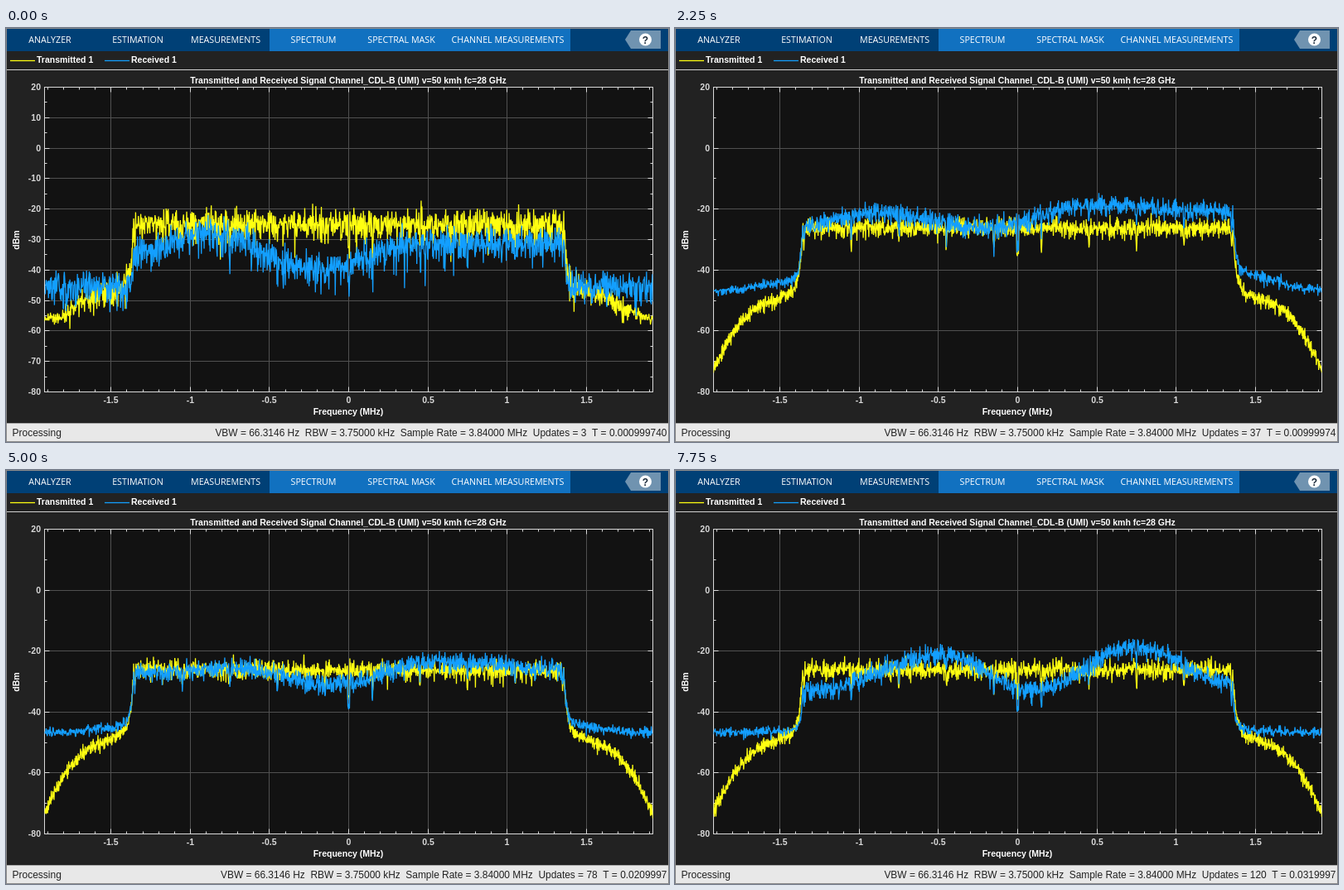
Animation, 800 px wide and 500 px high, one loop 8 s. Source, as an HTML page with a canvas:

```html
<!DOCTYPE html>
<html lang="en">
<head>
<meta charset="utf-8">
<title>Spectrum analyzer</title>
<style>
  html, body { margin: 0; width: 100%; height: 100%; overflow: hidden; background: #222; }
  canvas { display: block; }
</style>
</head>
<body>
<canvas id="stage" width="800" height="500"></canvas>
<script>
const ctx = document.getElementById('stage').getContext('2d');
const STEPS = 32, STEP_MS = 250, BINS = 1537, MEMORY = 0.515;
const BAND_EDGE = 1.357, BAND_LEVEL = -26, FLOOR = -46.6, STARTUP = -55.6;
const YELLOW = '#ffff11', BLUE = '#139fff';
const BOLD = 'bold 10.5px "Liberation Sans", Arial, sans-serif';
const PLOT = { left: 46.5, right: 780.5, top: 71.5, bottom: 439.5 };

const xOf = f => 413.5 + f * 191.15;
const yOf = db => PLOT.top + (20 - db) * 3.68;
const freq = i => -1.92 + i * 0.0025;
const toPower = db => 10 ** (db / 10);
const toDb = p => 10 * Math.log10(p);
const clamp = (v, lo, hi) => Math.min(hi, Math.max(lo, v));
const lerp = (a, b, u) => a + (b - a) * u;
const ease = u => (1 - Math.cos(Math.PI * clamp(u, 0, 1))) / 2;

// Flat band with narrow notches, then the filter roll-off
function signalShape(f) {
  const beyond = Math.abs(f) - BAND_EDGE;
  if (beyond > 0) {
    const tail = Math.max(0, Math.abs(f) - 1.6);
    return BAND_LEVEL - 20 * (1 - Math.exp(-beyond / 0.02)) - 20 * beyond - 155 * tail ** 2;
  }
  const notch = (Math.floor(f / 0.3) + 0.5) * 0.3;
  if (Math.abs(f) < 0.007) return BAND_LEVEL - 8;
  return BAND_LEVEL - (Math.abs(f - notch) < 0.004 ? 5 : 0);
}

// Received level in dBm: left edge, crest, fade, crest, right edge
const FADING = [
  { step: 0, level: [-34, -27, -40, -31, -31] },
  { step: 5, level: [-25.5, -21.5, -30, -22.5, -25] },
  { step: 9, level: [-25, -21, -26, -18.5, -20.5] },
  { step: 13, level: [-27, -23.7, -28.5, -19.5, -21.5] },
  { step: 17, level: [-26, -26.8, -30, -22.7, -23.5] },
  { step: 24, level: [-28.5, -24, -32, -23.3, -29] },
  { step: 31, level: [-33.5, -21, -33, -18.5, -30.5] }
];

function channelGain(step) {
  const k = Math.max(1, FADING.findIndex(c => c.step >= step));
  const [p, q] = [FADING[k - 1], FADING[k]];
  const u = (step - p.step) / (q.step - p.step);
  const level = p.level.map((v, i) => lerp(v, q.level[i], u));
  const drift = ease((step - 17) / 7);
  const knots = [-1.35, lerp(-0.9, -0.45, drift), lerp(-0.2, 0.08, drift),
    lerp(0.45, 0.75, drift), 1.35];
  return f => {
    const i = clamp(knots.findIndex(x => x > f) - 1, 0, 3);
    const j = f >= knots[4] ? 3 : i;
    return lerp(level[j], level[j + 1], ease((f - knots[j]) / (knots[j + 1] - knots[j]))) - BAND_LEVEL;
  };
}

let seed = 20177;
function random() {
  seed = (seed + 0x6D2B79F5) | 0;
  let r = Math.imul(seed ^ seed >>> 15, seed | 1);
  r ^= r + Math.imul(r ^ r >>> 7, r | 61);
  return ((r ^ r >>> 14) >>> 0) / 4294967296;
}
// Mean power of three random spectra
const periodogram = () => -Math.log((random() + 1e-6) * (random() + 1e-6) * (random() + 1e-6)) / 3;

// Running power averages, so that noise settles as updates accumulate
function buildTraces() {
  const shape = Array.from({ length: BINS }, (_, i) => signalShape(freq(i)));
  const noise = [shape.map(periodogram), shape.map(periodogram)];
  return Array.from({ length: STEPS }, (_, step) => {
    if (step) for (const n of noise)
      for (let i = 0; i < BINS; i++) n[i] = lerp(periodogram(), n[i], MEMORY);
    const decay = MEMORY ** step, gain = channelGain(step);
    const sent = [], received = [];
    shape.forEach((db, i) => {
      const f = freq(i);
      const calm = Math.abs(f) > BAND_EDGE && step ? 0.6 : 1;
      const rippled = db + (i % 2 ? 1 : -1);
      const signal = toPower(rippled + 1.5 * decay) * noise[0][i] ** calm;
      const startup = toPower(STARTUP) * decay * noise[0][i] ** 0.3;
      sent.push(toDb(signal + startup));
      const heard = toPower(rippled + gain(f)) + toPower(FLOOR + 1.3 * decay);
      received.push(toDb(heard * noise[1][i] ** calm));
    });
    return { sent, received };
  });
}
const traces = buildTraces();

function rect(x, y, w, h, color) {
  ctx.fillStyle = color;
  ctx.fillRect(x, y, w, h);
}

function line(x1, y1, x2, y2, color, width = 1) {
  ctx.strokeStyle = color;
  ctx.lineWidth = width;
  ctx.beginPath();
  ctx.moveTo(x1, y1);
  ctx.lineTo(x2, y2);
  ctx.stroke();
}

function text(str, x, y, align, color, font = BOLD) {
  ctx.font = font;
  ctx.textAlign = align;
  ctx.fillStyle = color;
  ctx.fillText(str, x, y);
}

function drawToolbar() {
  rect(0, 0, 800, 28, '#004076');
  rect(318, 0, 363, 28, '#1171c0');
  const tabs = [['ANALYZER', 53], ['ESTIMATION', 159], ['MEASUREMENTS', 265],
    ['SPECTRUM', 371], ['SPECTRAL MASK', 477], ['CHANNEL MEASUREMENTS', 605.5]];
  for (const [label, x] of tabs)
    text(label, x, 18, 'center', '#fff', '500 10.7px "Open Sans", "Noto Sans", sans-serif');
  ctx.fillStyle = '#7093b0';
  ctx.beginPath();
  for (const [x, y] of [[747, 14], [754, 3], [790, 3], [790, 25], [754, 25]]) ctx.lineTo(x, y);
  ctx.fill();
  ctx.fillStyle = '#fff';
  ctx.beginPath();
  ctx.arc(771.5, 14, 7.5, 0, 7);
  ctx.fill();
  text('?', 771.5, 18.5, 'center', '#1b2a3a', 'bold 12px "Liberation Sans", Arial, sans-serif');
}

function drawLegend() {
  line(5, 39.5, 35, 39.5, YELLOW, 1.3);
  text('Transmitted 1', 37, 42, 'left', '#fff');
  line(119, 39.5, 149, 39.5, BLUE, 1.3);
  text('Received 1', 151, 42, 'left', '#fff');
  line(0, 50.5, 800, 50.5, '#d0d0d0');
}

const snap = v => Math.floor(v) + 0.5;

function drawAxes(spacing) {
  const { left, right, top, bottom } = PLOT, grid = '#505050', ink = '#d9d9d9';
  rect(left, top, right - left, bottom - top, '#121212');
  for (let k = -19; k <= 19; k++) {
    const x = snap(xOf(k / 10)), major = k % 5 === 0, len = major ? 6 : 3;
    if (major) {
      line(x, top, x, bottom, grid);
      text(String(k / 10), x, 453, 'center', ink);
    }
    line(x, bottom, x, bottom - len, ink);
    line(x, top, x, top + len, ink);
  }
  for (let db = -80; db <= 20; db += spacing / 2) {
    const y = snap(yOf(db)), major = db % spacing === 0, len = major ? 6 : 3;
    if (major) {
      line(left, y, right, y, grid);
      text(String(db), 42, y + 3.5, 'right', ink);
    }
    line(left, y, left + len, y, ink);
    line(right, y, right - len, y, ink);
  }
  ctx.strokeStyle = ink;
  ctx.strokeRect(left, top, right - left, bottom - top);
  text('Transmitted and Received Signal Channel_CDL-B (UMI) v=50 kmh fc=28 GHz',
    413, 67, 'center', '#fff');
  text('Frequency (MHz)', 413, 467, 'center', '#fff');
  ctx.save();
  ctx.translate(16, 256);
  ctx.rotate(-Math.PI / 2);
  text('dBm', 0, 0, 'center', '#fff');
  ctx.restore();
}

function drawTrace(values, color) {
  ctx.strokeStyle = color;
  ctx.lineWidth = 1.3;
  ctx.lineJoin = 'bevel';
  ctx.beginPath();
  values.forEach((db, i) => ctx.lineTo(xOf(freq(i)), yOf(db)));
  ctx.stroke();
}

function drawStatus(step) {
  const family = '"Liberation Sans", Arial, sans-serif';
  const updates = Math.floor(3.75 * (step + 1));
  const time = ((step + 1) / 1000 - 2.6e-7).toPrecision(6);
  rect(0, 477, 800, 23, '#e8e8e8');
  line(0, 477.5, 800, 477.5, '#a8a8a8');
  text('Processing', 7.5, 493, 'left', '#222', `12px ${family}`);
  text('VBW = 66.3146 Hz  RBW = 3.75000 kHz  Sample Rate = 3.84000 MHz  ' +
    `Updates = ${updates}  T = ${time}`, 797.5, 493, 'right', '#222', `11.93px ${family}`);
}

function draw() {
  const step = Math.floor(performance.now() / STEP_MS) % STEPS;
  rect(0, 0, 800, 500, '#222');
  drawToolbar();
  drawLegend();
  drawAxes(step ? 20 : 10);
  ctx.save();
  ctx.beginPath();
  ctx.rect(PLOT.left, PLOT.top, PLOT.right - PLOT.left, PLOT.bottom - PLOT.top);
  ctx.clip();
  drawTrace(traces[step].sent, YELLOW);
  drawTrace(traces[step].received, BLUE);
  ctx.restore();
  drawStatus(step);
  ctx.strokeStyle = '#8a8a8a';
  ctx.strokeRect(0.5, 0.5, 799, 499);
  requestAnimationFrame(draw);
}
draw();
</script>
</body>
</html>
```
